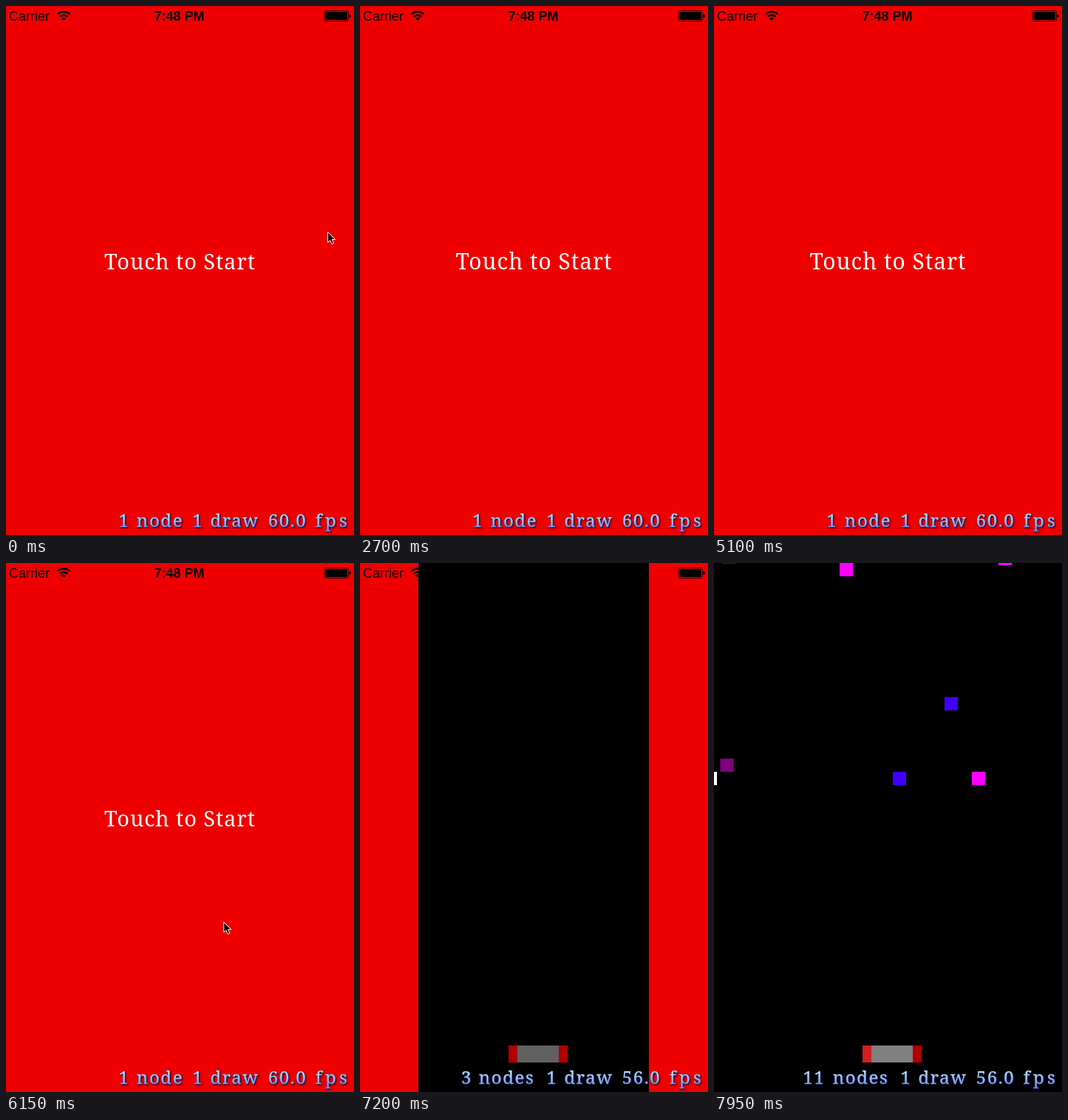
An HTML page that plays this animation: 471 px wide and 717 px high, repeating every 8000 ms.

```html
<!DOCTYPE html>
<html lang="en">
<head>
<meta charset="utf-8">
<title>Touch to Start</title>
<style>
  html, body { margin: 0; width: 100%; height: 100%; overflow: hidden; background: #ee0000; }
  svg { display: block; }
  text { white-space: pre; }
  #label { font: 29px "Noto Serif", serif; letter-spacing: .9px; fill: #fff; text-anchor: middle; }
  #stats { font: 24px "Noto Serif", serif; letter-spacing: 1.6px; fill: url(#ice); text-anchor: middle;
    stroke: url(#ice); stroke-width: .4px;
    filter: drop-shadow(0 0 .6px #000838) drop-shadow(1px 1px .8px #000838); }
  #fps { letter-spacing: 4.4px; }
  #status { font: 18px "Liberation Sans", Arial, sans-serif; }
  #clock { font-weight: bold; text-anchor: middle; }
</style>
</head>
<body>
<svg width="471" height="717" viewBox="0 0 471 717">
  <defs>
    <linearGradient id="ice" gradientUnits="userSpaceOnUse" x1="0" y1="687" x2="0" y2="711">
      <stop offset="0" stop-color="#bfe8ff"/>
      <stop offset="1" stop-color="#6f8cf0"/>
    </linearGradient>
  </defs>
  <rect width="471" height="717" fill="#ee0000"/>
  <g id="labelBox"><text id="label" x="235.500" y="357">Touch to Start</text></g>

  <rect id="space" y="0" height="717"/>
  <g id="rocks"></g>
  <g id="ship">
    <rect id="hull" x="201" y="654" width="80" height="23"/>
    <rect id="leftLight" x="201" y="654" width="12" height="23"/>
    <rect id="rightLight" x="269" y="654" width="12" height="23"/>
  </g>

  <g id="status">
    <text x="4" y="20">Carrier</text>
    <text id="clock" x="234.500" y="20">7:48 PM</text>
    <g fill="none" stroke="#000" stroke-width="2.3">
      <path d="M69.600 11.200A12 12 0 0 1 86.400 11.200M72.800 14.600A7.400 7.400 0 0 1 83.200 14.600"/>
      <path d="M78 20L74.900 16.900A4.400 4.400 0 0 1 81.100 16.900Z" fill="#000" stroke="none"/>
    </g>
    <rect x="430.500" y="6.500" width="33" height="14" rx="2" fill="none" stroke="#000" stroke-opacity=".75"/>
    <rect x="432" y="8" width="30" height="11" rx="1"/>
    <path d="M464.500 11Q467 11.500 467 13.500T464.500 16Z"/>
  </g>

  <g id="stats">
    <text id="count" y="706"></text>
    <text id="unit" y="706"></text>
    <text x="260" y="706">1</text>
    <text x="309.500" y="706">draw</text>
    <text id="rate" x="381" y="706"></text>
    <text id="fps" x="442.500" y="706">fps</text>
  </g>
  <path id="cursor" d="M.5 .5V14.500L3.700 11.500 6 16.700 8.500 15.600 6.200 10.500H10.500Z" stroke="#fff" stroke-width="1"/>
</svg>
<script>
const LOOP = 8000, STEP = 150;
const ROCK = 18, SPAWN_Y = -9, FALL = 0.00108;
const $ = id => document.getElementById(id);
const set = (id, attrs) => {
  for (const key in attrs) $(id).setAttribute(key, attrs[key]);
};
const progress = (t, from, to) => Math.min(1, Math.max(0, (t - from) / (to - from)));
const mix = (a, b, p) => a + (b - a) * p;

// left edge, age at 7950 ms, colour
const rocks = [
  [-14, 528, "#fff"], [242, 528, "#4000ff"], [349, 528, "#ff00ff"], [8.4, 512, "#800080"],
  [312, 430, "#4000ff"], [170, 129, "#ff00ff"], [385, 53, "#ff00ff"], [11.500, 30, "#333300"]
].map(([x, age, fill]) => {
  const el = document.createElementNS("http://www.w3.org/2000/svg", "rect");
  Object.entries({ x, fill, width: ROCK, height: ROCK }).forEach(([k, v]) => el.setAttribute(k, v));
  $("rocks").append(el);
  return { el, born: 7950 - age };
});

function drawLabel(t) {
  const beat = (t - 160 + 2400) % 2400;
  const scale = 1 + 0.05 * Math.max(0, 1 - Math.abs(beat - 200) / 200);
  set("labelBox", {
    transform: `translate(235 347) scale(${scale}) translate(-235 -347)`,
    opacity: 1 - progress(t, 6300, 6600)
  });
}

function drawCursor(t) {
  const leaving = t < 450, tapping = t >= 5700 && t < 6600;
  const p = leaving ? progress(t, 0, 300) : 1 - (1 - progress(t, 5700, 6300)) ** 2;
  const [x, y] = leaving ? [mix(435, 468, p), mix(306, 320, p)] : [mix(358, 290, p), mix(580, 480, p)];
  set("cursor", { transform: `translate(${x} ${y})`, visibility: leaving || tapping ? "visible" : "hidden" });
}

function drawGame(t) {
  const open = t > 6930;
  const half = Math.min(236, Math.max(0, 156 * (t - 6930) / 270));
  set("space", { x: 235 - half, width: half * 2 });

  const gray = Math.round(128 * progress(t, 6750, 7350));
  const red = Math.round(176 * progress(t, 6900, 7200));
  const flash = 32 * progress(t, 7500, 7950);
  set("ship", { visibility: open ? "visible" : "hidden" });
  set("hull", { fill: `rgb(${gray},${gray},${gray})` });
  set("leftLight", { fill: `rgb(${red + flash},${flash},${flash})` });
  set("rightLight", { fill: `rgb(${red},0,0)` });

  let live = 0;
  for (const { el, born } of rocks) {
    const age = t - born;
    if (age >= 0) live++;
    el.setAttribute("visibility", age >= 0 ? "visible" : "hidden");
    el.setAttribute("y", SPAWN_Y + FALL * age * age - ROCK / 2);
  }
  drawStats(open, open ? 3 + live : 1);
}

function drawStats(open, nodes) {
  $("count").textContent = nodes;
  $("unit").textContent = open ? "nodes" : "node";
  $("rate").textContent = open ? "56.0" : "60.0";
  set("count", { x: !open ? 160 : nodes > 9 ? 135.500 : 144.500 });
  set("unit", { x: open ? 198.500 : 208.500 });
}

function draw(now) {
  const t = Math.floor(now % LOOP / STEP) * STEP;
  drawLabel(t);
  drawCursor(t);
  drawGame(t);
}

const start = performance.now();
function tick() {
  draw(performance.now() - start);
  requestAnimationFrame(tick);
}
tick();
</script>
</body>
</html>
```
